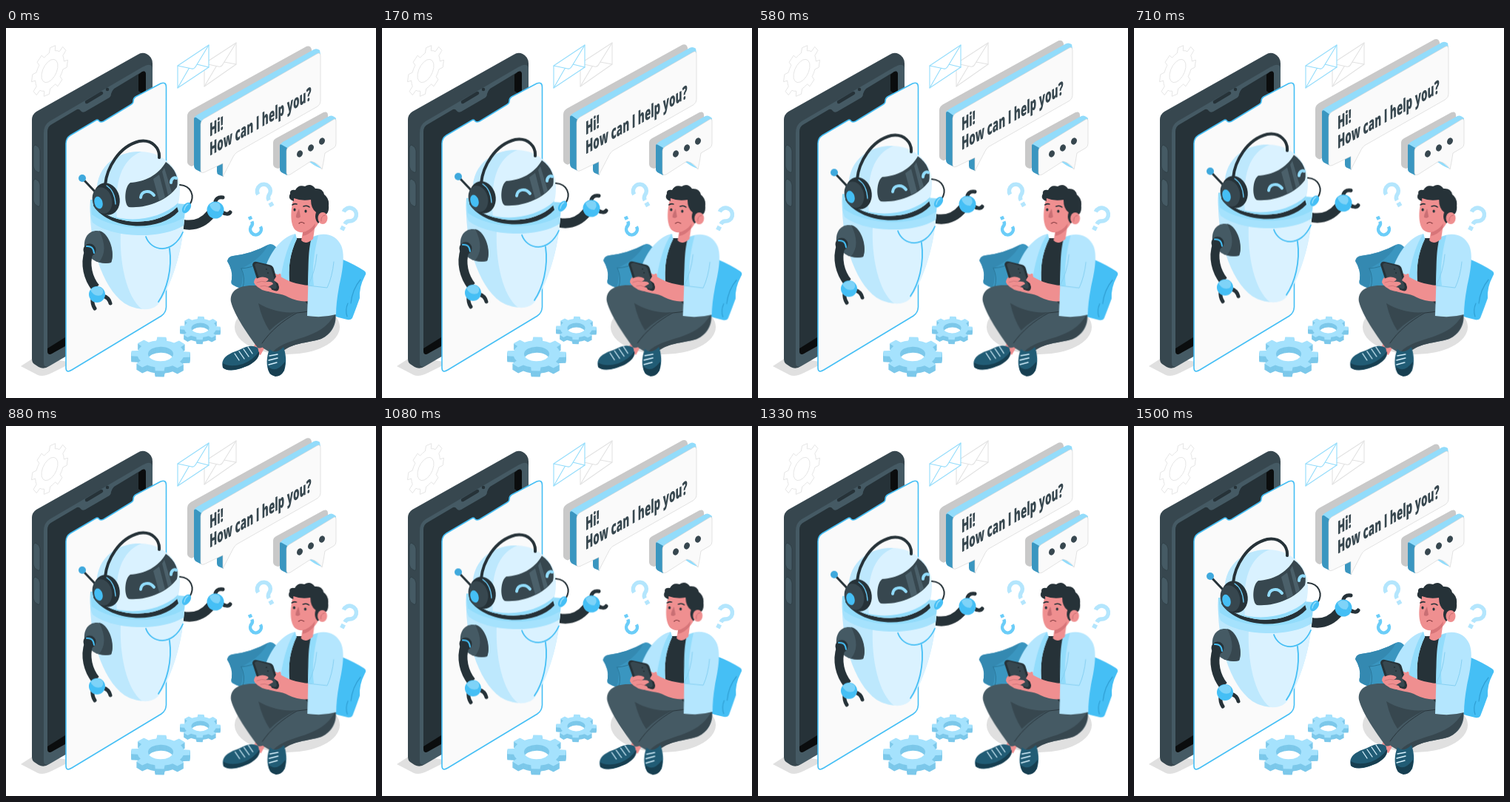
These frames come from a looping animation (500x500 px, 1.54 s). An HTML page:

```html
<!DOCTYPE html>
<html lang="en">
<head>
<meta charset="utf-8">
<title>Chat bot</title>
<style>
  html, body { margin: 0; width: 100%; height: 100%; overflow: hidden; background: #fff; }
  svg { display: block; width: 100%; height: 100%; }
  .float { animation: float 1540ms linear infinite; }
  .sway { transform-origin: 389.5px 342px; animation: sway 1540ms linear infinite; }
  /* 1500 ms of motion, then a 40 ms rest */
  @keyframes float {
    0%, 97.4%, 100% { transform: translateY(0); }
    48.7% { transform: translateY(-10px); }
  }
  @keyframes sway {
    0%, 97.4%, 100% { transform: rotate(0); }
    24.35% { transform: rotate(1deg); }
    73.05% { transform: rotate(-1deg); }
  }
  .line { fill: none; stroke-linecap: round; stroke-linejoin: round; }
  .ink { fill: #263238; }
  .slate { fill: #37474f; }
  .steel { fill: #455a64; }
  .blue { fill: #45bff5; }
  .sky { fill: #a5e2fd; }
  .mist { fill: #b4e6fe; }
  .azure { fill: #92dcfb; }
  .deep { fill: #3a96c0; }
  .paper { fill: #fafafa; }
  .skin { fill: #ef8f90; }
  .shade { fill: #c9c9c9; }
  .dark { stroke: #263238; }
  text { font: 800 25px "Open Sans", "Noto Sans", sans-serif; fill: #37474f; }
</style>
</head>
<body>
<svg viewBox="0 0 500 500">
  <defs>
    <g id="mark" class="line" style="stroke-linecap:butt">
      <path d="M-9 -5A9 9 0 1 1 3 3Q0 5 0 9" stroke-width="5.5"/>
      <path d="M0 12.5V18" stroke-width="6"/>
    </g>
  </defs>

  <path id="cog" fill="#fff" stroke="#e0e0e0" stroke-width=".8"/>

  <g id="device">
    <path d="M20 457L40 444L90 452L62 466Q50 472 43 469Z" fill="#e0e0e0"/>
    <path class="slate" d="M35 124Q35 117 41 113L178 36Q184 32 190 35Q198 39 198 48V340L58 457Q51 462 44 458L38 454Q35 452 35 447Z"/>
    <path class="steel" d="M51 142Q51 131 59 126L184 53Q198 45 198 56V375L60 456Q51 461 51 452Z"/>
    <path class="ink" d="M56 140Q56 133 62 130L96 110Q99 109 101 112Q103 115 107 113L138 95Q142 93 142 89Q143 85 146 82L184 59Q189 57 189 63V360L62 440Q56 443 56 436Z"/>
    <path d="M179 63L184 59Q189 57 189 63V92L179 85ZM56 433L80 418V430L62 440Q56 443 56 436Z" fill="#0b0d0e"/>
    <path class="line dark" d="M109 100L129 88M137 83v0" stroke-width="4.5"/>
    <g class="steel" stroke="#2d3b42" stroke-width=".8">
      <path d="M37 162Q37 158 40 158Q46 161 46 166V192Q46 196 43 195Q37 192 37 187Z"/>
      <path d="M37 208Q37 204 40 204Q46 207 46 212V237Q46 242 43 241Q37 238 37 233Z"/>
    </g>
    <path class="paper" stroke="#45bff5" stroke-width="1.6" d="M81 156Q81 149 87 145L121 125Q124 123 126 126Q128 128 132 126L168 104Q172 102 172 99Q172 95 175 93L209 75Q216.5 72 216.5 80V377Q216 385 210 389L89 462Q81 467 81 459Z"/>
  </g>

  <g class="line" stroke-width="1.1">
    <g stroke="#e2e2e2">
      <path d="M268 48L311 20V49L268 79Z"/>
      <path d="M268 48L287 52Q291 53 293 49L311 20M268 79L284 52M311 49L295 46"/>
    </g>
    <g stroke="#92dcfb">
      <path d="M232 51L274 23V53L232 81Z" fill="#fff"/>
      <path d="M232 51L251 55Q254 56 257 51L274 23M232 81L247 55M274 53L258 49"/>
    </g>
  </g>

  <g id="gears"></g>

  <g id="bubble" class="float">
    <path class="shade" d="M245 119Q245 114 250 111L404 26Q411 22 413 29V95L251 187Q245 185 245 181Z"/>
    <path class="azure" d="M254 122Q255 119 259 117L416 29Q420 27 424 30L425 36L264 129Z"/>
    <path class="deep" d="M254 123Q254 120 257 121L264 126V195L258 192Q254 190 254 186ZM285 181L294 176V201L287 198Q285 197 285 194Z"/>
    <path class="paper" stroke="#d0d0d0" stroke-width=".6" d="M263 130Q263 126 267 123L420 35Q425 32 425 38V99Q425 103 421 106L312 168Q309 170 307 174L293 201V183L268 195Q263 197 263 192Z"/>
    <text transform="matrix(.54 -.3 0 1 275 147)">Hi!</text>
    <text transform="matrix(.54 -.3 0 1 275 173)">How can I help you?</text>
  </g>

  <g id="typing">
    <path class="shade" d="M361 155Q361 151 365 149L429 114Q435 112 435 118V153L368 190Q361 189 361 184Z"/>
    <path class="azure" d="M370 158L374 154L437 119Q441 117 446 122V126L379 165Z"/>
    <path class="deep" d="M370 159Q370 156 373 158L380 162V199L374 196Q370 194 370 191Z"/>
    <path class="azure" d="M410 181L414 179L427 190Q421 189 410 181Z"/>
    <path class="paper" stroke="#d0d0d0" stroke-width=".6" d="M379 166Q379 162 383 160L442 124Q446 121 446 126V156Q446 160 443 162L431 169Q429 183 427 191Q423 183 412 180L384 198Q379 200 379 195Z"/>
    <g class="slate">
      <ellipse cx="397" cy="170" rx="3.8" ry="4.8" transform="rotate(25 397 170)"/>
      <ellipse cx="412" cy="162" rx="3.8" ry="4.8" transform="rotate(25 412 162)"/>
      <ellipse cx="427" cy="153" rx="3.8" ry="4.8" transform="rotate(25 427 153)"/>
    </g>
  </g>

  <use href="#mark" stroke="#b4e6fd" transform="translate(351 225) rotate(-29)"/>
  <use href="#mark" stroke="#6bcdf8" transform="translate(335.5 268) rotate(154) scale(.82)"/>
  <use href="#mark" stroke="#b4e6fd" transform="translate(462 257) rotate(27)"/>

  <g id="robot" class="float">
    <path class="line dark" d="M238 265C256 269 268 262 277 251" stroke-width="13" style="stroke-linecap:butt"/>
    <path class="line dark" d="M283 238C282 231 287 228 293 229M291 248C296 252 301 252 303 249" stroke-width="5"/>
    <circle class="blue" cx="283" cy="246" r="11.5"/>
    <path d="M275 239Q281 233 288 237Q292 243 287 248Q278 248 275 239Z" fill="#7ed3f8"/>

    <path d="M114 232C111 290 129 350 160 372C178 383 199 382 207 371C227 341 241 292 242 240Z" fill="#bde8fd"/>
    <path d="M155 274C153 318 163 364 184 380C196 381 204 377 208 370C227 341 239 295 241 255Z" fill="#daf2ff"/>
    <path class="sky" d="M114 232C113 247 114 256 117 263C144 284 210 286 240 267L242 238Z"/>
    <path class="azure" d="M116 252C144 273 206 277 241 256L242 238L114 232Z"/>
    <path class="line" stroke="#45bff5" stroke-width="1.8" d="M189 282C196 302 225 307 239 276M221 298C225 326 217 354 206 370"/>

    <path class="ink" d="M118 240C138 272 205 278 233 248L230 238L123 230Z"/>
    <path d="M123 228C119 190 147 166 183 167C214 168 236 192 235 217Q235 234 231 242C206 268 154 267 126 246Z" fill="#daf2ff"/>
    <path d="M123 228C119 190 147 166 183 167C156 178 146 207 150 257Q129 250 123 228Z" fill="#bde8fd"/>
    <path class="azure" d="M130 249C158 264 205 262 233 236L231 242C206 268 154 267 126 246Z"/>
    <path class="slate" d="M168 209C187 208 206 199 216 181C229 190 234 203 231 215C218 233 190 244 166 242C159 238 160 214 168 209Z"/>
    <path d="M199 204L207 198L215 229L207 233ZM211 194L214 189L224 222L219 226Z" fill="#4b606a"/>
    <path class="line" stroke="#92dcfb" stroke-width="4" d="M182 229C183 220 194 218 200 226M223 209C223 204 227 201 230 203"/>

    <path class="line dark" stroke-width="4" d="M134 212C136 190 152 160 180 153C198 150 208 163 207 175"/>
    <path class="line dark" stroke-width="3" d="M103 203L121 222"/>
    <circle cx="103" cy="203" r="5" fill="#3fa9dd"/>
    <ellipse class="ink" cx="136" cy="231" rx="17.5" ry="22" transform="rotate(-14 136 231)"/>
    <ellipse class="slate" cx="130" cy="233" rx="13" ry="18" transform="rotate(-14 130 233)"/>
    <path class="line" stroke="#6bcdf8" stroke-width="1.3" d="M136 213Q147 220 148 238"/>
    <ellipse class="blue" cx="125" cy="236" rx="5.5" ry="8.5" transform="rotate(-16 125 236)"/>
    <path class="line dark" stroke-width="2" d="M235 212C250 213 256 227 248 239"/>
    <ellipse class="blue" cx="244" cy="243" rx="5" ry="8" transform="rotate(35 244 243)"/>
    <path class="line" stroke="#92dcfb" stroke-width="1.5" d="M241 246Q242 240 246 238"/>

    <path class="steel" d="M106 298C104 279 116 271 129 275C142 282 147 306 142 317C128 321 112 314 106 298Z"/>
    <path class="slate" d="M126 274C141 279 147 306 142 317Q134 319 126 316Q139 300 126 274Z"/>
    <circle class="ink" cx="113" cy="300" r="8.5"/>
    <path class="line dark" stroke-width="12" d="M112 302C106 320 111 338 121 351" style="stroke-linecap:butt"/>
    <path class="line" stroke="#45bff5" stroke-width="2" d="M109 295Q118 294 119 304"/>
    <path class="line dark" stroke-width="5" d="M117 365Q116 373 120 379M131 362Q139 364 141 372"/>
    <circle class="blue" cx="123" cy="360" r="11"/>
    <path d="M114 354Q122 346 130 352Q133 357 129 361Q119 364 114 354Z" fill="#7ed3f8"/>
  </g>

  <ellipse cx="380" cy="404" rx="71" ry="37" fill="#e0e0e0"/>
  <g id="person" class="sway">
    <path class="deep" d="M299 315Q300 309 307 308Q332 305 354 293Q359 290 364 295Q374 306 373 330L348 353Q322 357 306 347Q303 345 305 340Q307 328 299 315Z" fill="#3a96c0"/>
    <path d="M299 315Q300 309 307 308Q332 305 354 293Q345 312 318 325Q322 338 317 351Q303 348 305 340Q307 328 299 315Z" fill="#3489b1"/>
    <path class="line" stroke="#2a7699" stroke-width="1" d="M318 325Q324 338 320 351M318 325Q332 324 342 318"/>
    <path class="blue" d="M440 312H453Q470 319 484 328Q488 331 485 335Q477 350 478 365Q473 379 468 392Q466 395 461 394Q450 392 438 387Z"/>
    <path class="line" stroke="#2f9fd4" stroke-width="1.2" d="M479 340Q468 353 466 372M461 390Q458 381 462 372"/>

    <path class="skin" d="M337 425L350 431L344 442L333 437Z"/>
    <path class="steel" d="M336 348C313 347 302 356 304 370C309 389 327 414 340 432Q345 434 351 428L378 410L405 392L408 365L380 350Z"/>
    <path class="steel" d="M408 362L445 384C448 400 440 414 426 420C404 427 388 424 370 440Q353 440 343 428C354 413 370 396 386 387Z"/>
    <path class="slate" d="M341 372C356 381 374 386 393 384Q370 395 356 409Q346 394 341 372ZM445 386C446 402 438 414 426 420C404 427 388 424 370 440Q364 440 360 438C382 415 424 424 445 386Z"/>
    <path class="line dark" stroke-width=".9" d="M346 426C357 410 373 396 393 385Q417 383 425 377"/>

    <path d="M340 432C329 426 321 433 310 437C296 442 290 449 293 459C302 466 317 461 327 456C339 450 344 441 340 432Z" fill="#215c75"/>
    <path d="M293 453Q303 459 320 454Q335 448 342 437Q344 447 328 456Q301 467 293 459Z" fill="#173f51"/>
    <path d="M356 434C352 444 351 457 356 466C361 472 371 471 376 463C380 451 378 440 375 431Q364 442 356 434Z" fill="#215c75"/>
    <path d="M354 457Q364 468 377 451Q378 470 364 471Q354 469 354 457Z" fill="#173f51"/>
    <path class="line" stroke="#d8f2fe" stroke-width="1.3" d="M309 440L315 449M315 437L322 447M321 434L328 444M327 431L333 440M356 443L367 441M355 449L367 446M355 455L366 452"/>

    <path class="ink" d="M388 284C383 305 381 330 383 346L410 376L415 284Z"/>
    <path class="mist" d="M391 278C374 282 360 299 352 319L360 333L383 347C381 322 384 304 393 285Z"/>
    <path class="azure" d="M391 278Q378 296 371 338L383 347C381 322 384 304 393 285Z"/>

    <path class="skin" d="M411 348C393 347 377 341 367 333C353 327 335 334 335 344C338 350 345 350 349 354C359 359 372 358 382 364Q396 371 411 369Z"/>
    <path class="ink" d="M333 320Q334 315 339 316L356 320Q361 321 362 326L369 350Q369 357 363 355L346 349Q341 347 340 342Z"/>
    <path class="slate" d="M336 320Q338 317 341 318L355 322Q358 323 359 327L366 350Q365 354 361 352L347 347Q344 345 343 341Z"/>
    <path class="line dark" stroke-width="2.2" d="M352 326v0M354 331v0"/>
    <path class="skin" d="M336 340Q346 334 353 338Q357 340 351 343Q360 342 361 346L354 350Q361 351 358 356Q344 356 336 346Z"/>
    <path class="skin" d="M362 341Q367 331 371 332Q373 337 370 347Z"/>
    <path class="line" stroke="#c96f74" stroke-width=".8" d="M339 344Q346 341 351 343M344 349Q350 347 355 350"/>

    <path class="mist" d="M413 283C430 274 447 280 453 294C459 308 454 332 450 350Q446 372 446 387Q428 392 407 389C409 349 408 310 413 283Z"/>
    <path class="azure" d="M413 283L422 280Q412 320 416 348L408 348C409 318 408 302 413 283Z"/>
    <path class="line" stroke="#86d0f2" stroke-width="1" d="M420 306Q418 330 408 348L434 351Q441 336 443 316"/>

    <path class="skin" d="M389 228C383 251 385 267 391 273Q397 277 401 276L399 287Q405 294 415 285L417 271C426 262 430 244 423 226Z"/>
    <path d="M401 276Q411 274 418 264L417 271Q409 280 401 281Z" fill="#d77579"/>
    <path class="ink" d="M389 234Q380 231 384 224Q383 218 391 219Q395 211 404 214Q412 209 418 217Q428 216 430 225Q437 230 436 240Q437 250 431 253L422 264Q416 258 419 249Q412 244 412 232Q399 234 389 230Z"/>
    <ellipse class="skin" cx="428" cy="257" rx="6.5" ry="8"/>
    <path class="line" stroke="#c96f74" stroke-width="1" d="M426 261Q425 254 431 253"/>
    <path d="M396 244Q391 253 392 256Q396 258 398 255Z" fill="#c96f74"/>
    <path class="line dark" stroke-width="1.6" d="M387 239Q390 237 393 238M402 241Q407 239 410 242"/>
    <path class="line dark" stroke-width="3" d="M390 245v1M405 247v1"/>
    <path class="line" stroke="#7a343a" stroke-width="1.2" d="M396 264Q399 261 403 264"/>
  </g>
</svg>
<script>
  const svgNS = "http://www.w3.org/2000/svg";

  // Outline of a gear with a round hole, in its own plane.
  function gearPath(r, hole, teeth = 8) {
    const step = Math.PI * 2 / teeth;
    const inner = r * 0.79;
    const at = (radius, a) => `${(radius * Math.cos(a)).toFixed(2)} ${(radius * Math.sin(a)).toFixed(2)}`;
    let d = "";
    for (let i = 0; i < teeth; i++) {
      const a = i * step;
      d += `${i ? "L" : "M"}${at(inner, a - step * .27)}L${at(r, a - step * .19)}` +
           `L${at(r, a + step * .19)}L${at(inner, a + step * .27)}` +
           `A${inner} ${inner} 0 0 1 ${at(inner, a + step * .73)}`;
    }
    return `${d}ZM${hole} 0A${hole} ${hole} 0 1 0 ${-hole} 0A${hole} ${hole} 0 1 0 ${hole} 0Z`;
  }

  function drawGear(path, r, hole, transform) {
    path.setAttribute("d", gearPath(r, hole));
    path.setAttribute("fill-rule", "evenodd");
    path.setAttribute("transform", transform);
  }

  // Flat gear lying on the floor, built up in thin layers.
  function floorGear(x, y, r, hole, depth) {
    for (let h = depth; h >= 0; h--) {
      const path = document.createElementNS(svgNS, "path");
      path.setAttribute("fill", h ? "#7cc8ea" : "#a5e2fd");
      drawGear(path, r, hole, `translate(${x} ${y + h}) scale(1 .577) rotate(2)`);
      document.getElementById("gears").append(path);
    }
  }

  floorGear(209, 440.5, 40, 17, 8);
  floorGear(262.5, 405.5, 27.5, 12, 6);
  drawGear(document.getElementById("cog"), 31, 14, "matrix(.79 -.5 0 1 59 58) rotate(10)");
</script>
</body>
</html>
```
